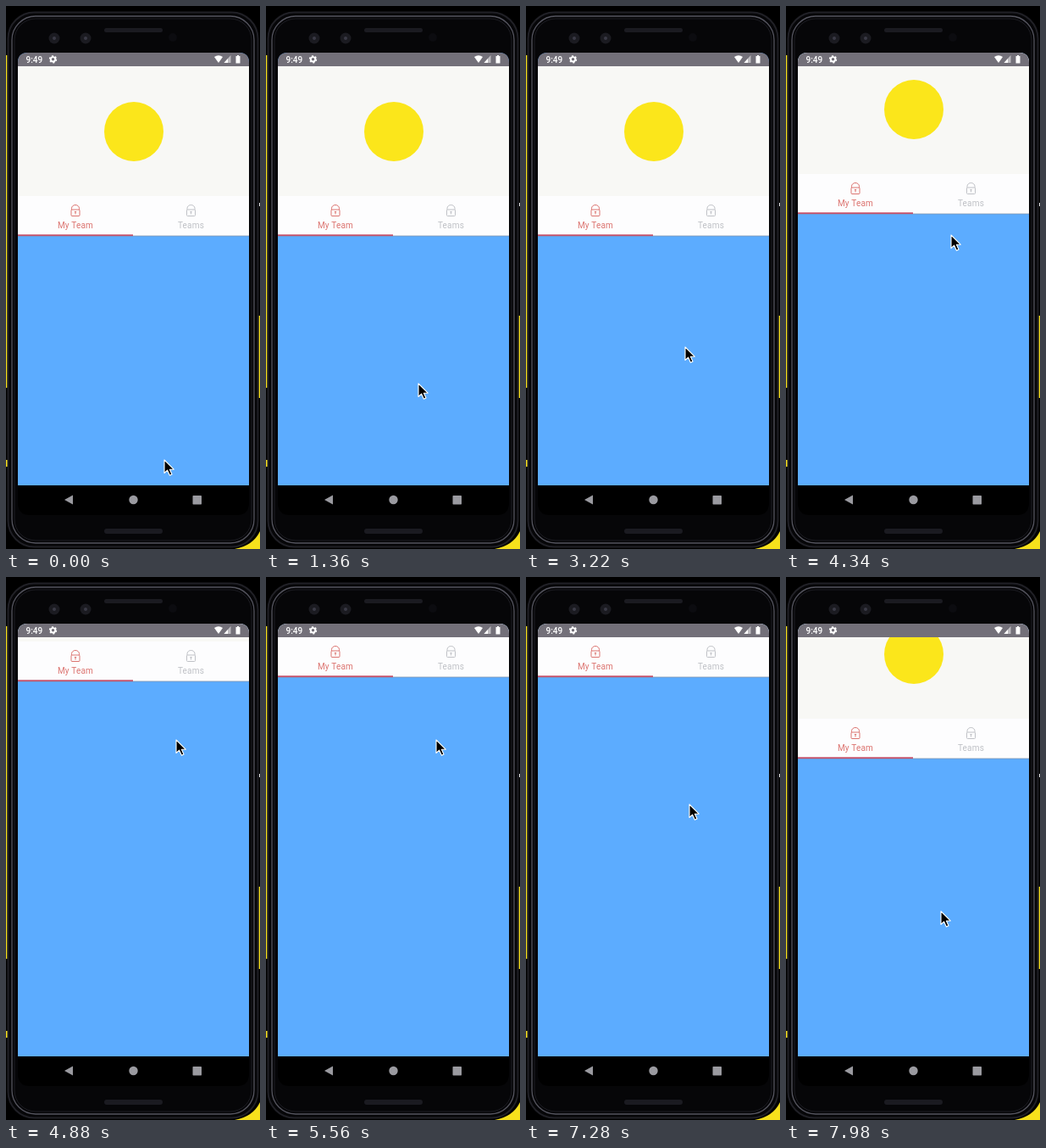
An HTML page for the animation above (8000 ms loop, 300 px wide and 640 px high).

```html
<!DOCTYPE html>
<html lang="en">
<head>
<meta charset="utf-8">
<title>Collapsing header</title>
<style>
  html, body { margin: 0; width: 100%; height: 100%; overflow: hidden; background: #000; }
  svg { display: block; width: 100vw; height: 100vh; }
  text { font-family: Roboto, sans-serif; font-size: 10px; }
</style>
</head>
<body>
<svg viewBox="0 0 300 640">
  <defs>
    <clipPath id="screen"><path d="M14 565V67Q14 55 26 55H275Q287 55 287 67V565Z"/></clipPath>
    <g id="lock" fill="none" stroke="currentColor" stroke-width="1">
      <path d="M-4.5 -1V-2.5A4.5 4 0 0 1 4.5 -2.5V-1"/>
      <rect x="-5" y="-1" width="10" height="7.5" rx="1"/>
      <path d="M0 1V4.5M-1.2 1.6H1.2"/>
    </g>
  </defs>

  <!-- Surroundings and phone body -->
  <rect width="300" height="640"/>
  <path d="M0 58H1.5V450H0ZM0 535H2V543H0ZM298.5 365H300V462H298.5ZM300 619V640H270Q292 636 300 619Z" fill="#f7e11c"/>
  <path d="M299 232H300V236H299Z" fill="#ddd"/>
  <g fill="none">
    <rect x="2.5" y="7.5" width="295" height="630" rx="31" fill="#060608" stroke="#202026" stroke-width="2"/>
    <rect x="7" y="12" width="286" height="621" rx="28" stroke="#54545e" stroke-width="1.3"/>
    <rect x="10" y="15" width="280" height="615" rx="25" stroke="#1c1c22"/>
  </g>
  <path d="M14 565H287V585Q287 600 273 600H28Q14 600 14 585Z"/>
  <g fill="#1b1b21">
    <rect x="116" y="26" width="69" height="5" rx="2.5"/>
    <rect x="116" y="616" width="69" height="6" rx="3"/>
    <circle cx="57" cy="38" r="6.5"/>
    <circle cx="94" cy="38" r="6.5"/>
    <circle cx="197" cy="37" r="5" fill="#0c0c10"/>
  </g>
  <g fill="#3a3a46"><circle cx="57" cy="38" r="2"/><circle cx="94" cy="38" r="2"/></g>

  <!-- App -->
  <g clip-path="url(#screen)">
    <rect x="14" y="55" width="273" height="510" fill="#5cacff"/>
    <g id="header">
      <rect x="14" y="71" width="273" height="153" fill="#f8f8f5"/>
      <circle cx="151" cy="148" r="35" fill="#fbe61b"/>
      <rect x="14" y="224" width="273" height="47" fill="#fdfdfe"/>
      <path d="M14 271H287" stroke="#8296ad" stroke-width=".8"/>
      <rect x="14" y="269.3" width="136" height="1.8" fill="#c4506a"/>
      <g color="#dc7470" fill="currentColor" text-anchor="middle">
        <use href="#lock" x="82" y="241"/>
        <text x="82" y="261.7" letter-spacing=".2">My Team</text>
      </g>
      <g color="#bfc1c6" fill="currentColor" text-anchor="middle">
        <use href="#lock" x="218.5" y="241"/>
        <text x="218.5" y="261.7" letter-spacing=".2">Teams</text>
      </g>
    </g>
    <rect x="14" y="55" width="273" height="16" fill="#737079"/>
    <g fill="#fff">
      <text x="23.5" y="66.5" font-weight="500">9:49</text>
      <circle cx="55.5" cy="62.8" r="2.7" fill="none" stroke="#fff" stroke-width="1.9"/>
      <circle cx="55.5" cy="62.8" r="4" fill="none" stroke="#fff" stroke-width="1.3" stroke-dasharray="2.1 2.09"/>
      <path d="M246 60Q251 56.5 256 60L251 67Z"/>
      <path d="M265.5 58V67H257.5Z" opacity=".55"/>
      <path d="M262 62V67H257.5Z"/>
      <path d="M271.5 59H273V58H275V59H276.5V67.5H271.5Z"/>
    </g>
  </g>

  <g fill="#9a9aa0">
    <path d="M69 582L79 576.5V587.5Z"/>
    <circle cx="150.5" cy="582" r="5.2"/>
    <rect x="220.5" y="577" width="10.5" height="10.5" rx=".7"/>
  </g>

  <path id="cursor" d="M0 0V15.5L3.6 12.2L6.4 18.2L9 17L6.4 11.2H11.2Z" stroke="#fff" stroke-width="1.1" stroke-linejoin="round"/>
</svg>
<script>
const LOOP = 8000;
const header = document.getElementById('header');
const cursor = document.getElementById('cursor');

function draw() {
  const time = performance.now() % LOOP;
  const progress = (start, end) => Math.min(1, Math.max(0, (time - start) / (end - start)));

  const rise = progress(540, 1260);
  const approach = progress(2830, 4200);
  const dragUp = progress(4220, 4700);
  const fling = progress(4700, 4900);
  const goBack = progress(5900, 6900);
  const lower = progress(7280, LOOP);
  const dragDown = progress(7450, LOOP);

  const x = 187 - 7 * rise + 13 * progress(1600, 4200) + 8 * (dragUp - goBack) - 10 * lower;
  const y = 535 - 90 * rise - 149 * approach - 104 * dragUp + 76 * goBack + 129 * lower;
  const scroll = 104 * dragUp + 49 * fling - 99 * dragDown;

  cursor.setAttribute('transform', `translate(${Math.round(x)} ${Math.round(y)})`);
  header.setAttribute('transform', `translate(0 ${-Math.round(scroll)})`);
  requestAnimationFrame(draw);
}
draw();
</script>
</body>
</html>
```
